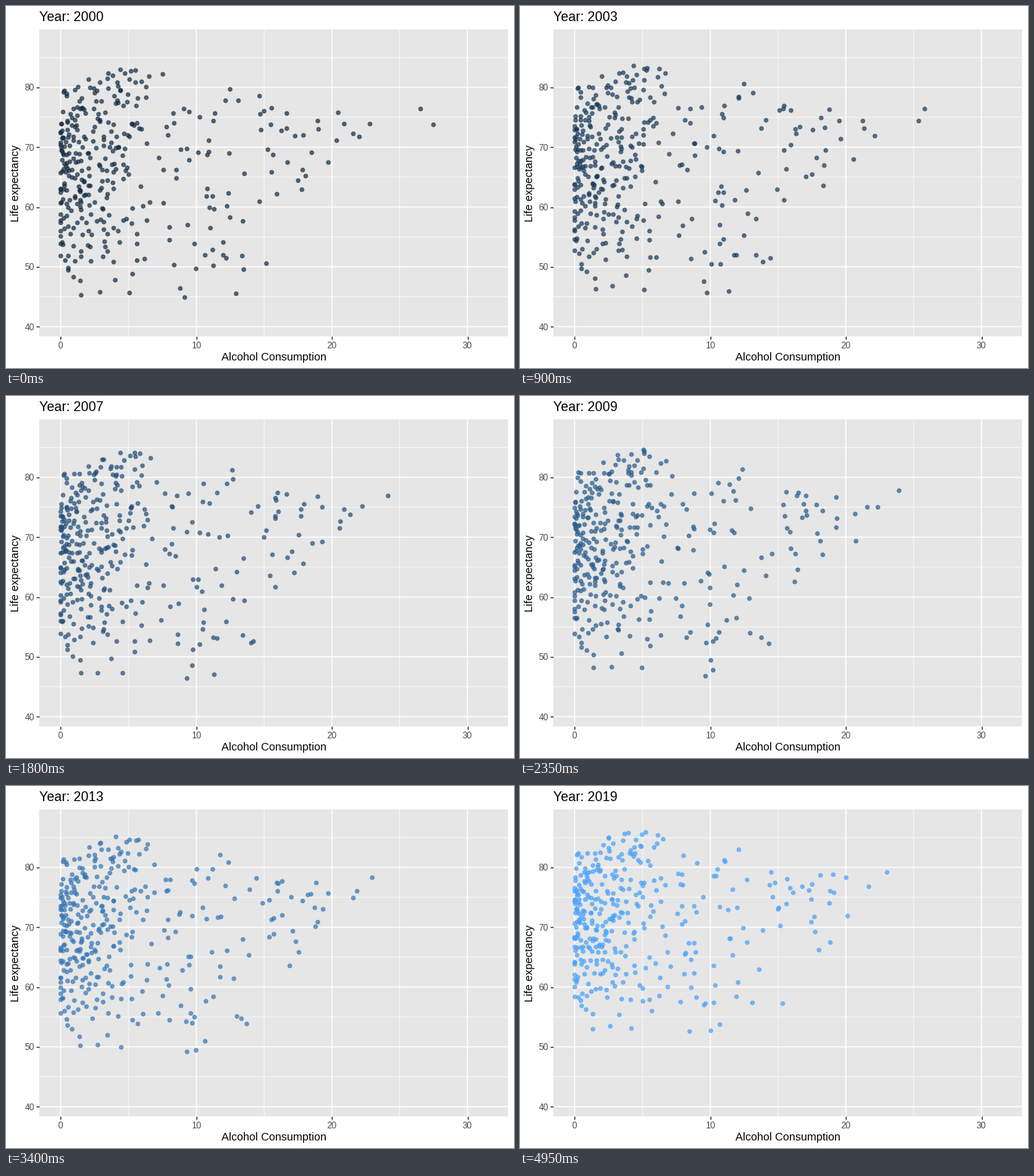
A matplotlib script for the animation above (5 s loop, 672 by 480 pixels).

```python
import numpy as np
import matplotlib.pyplot as plt
from matplotlib.animation import FuncAnimation

W, H, DPI = 672, 480, 96
FRAMES, INTERVAL = 100, 50
FIRST_YEAR, SPAN = 2000, 19
LEFT, RIGHT, TOP, BOTTOM = 44.2, 664.5, 30.6, 438.3
DARK, LIGHT = np.array([19, 43, 67]), np.array([74, 162, 248])
ALPHA = 0.7
COUNTRIES = 183

plt.rcParams["font.family"] = "Liberation Sans"
rng = np.random.default_rng(7)
years = np.arange(SPAN + 1)
key_frames = np.round(years * (FRAMES - 1) / SPAN)


def column(low, high):
    return rng.uniform(low, high, (COUNTRIES, 1))


def spread():
    """Evenly spaced values in (0, 1), in random order."""
    return rng.permutation((np.arange(COUNTRIES) + 0.5) / COUNTRIES)[:, None]


def make_data():
    """Yearly drinking and life expectancy, women first, then men."""
    t = years / SPAN
    wealth, habit = spread(), spread()
    health = wealth ** 0.6

    women_x = np.maximum(7.4 * habit ** 1.5 * (0.5 + 0.5 * wealth) - 0.04, 0)
    men_x = women_x * column(2.9, 4.2)
    # The heaviest drinkers cut back most
    trend = rng.normal(0, 0.15, (COUNTRIES, 1)) - 0.25 * (men_x / 30) ** 3
    change = 1 + trend * t

    best = 31 + 6 * np.sqrt(women_x / 7.4)
    # The shortest lives gain most, and late
    gain = 8 * (1 - health) * t ** 1.4 + 2.8 * health * t
    women_y = 47.5 + best * health + gain
    gap = column(1.5, 4.5) + men_x * column(0.1, 0.4) * (1 - 0.5 * wealth)

    x = np.vstack([women_x * change, men_x * change])
    y = np.vstack([women_y, women_y - gap])
    x *= 1 + rng.normal(0, 0.035, x.shape)
    y += rng.normal(0, 0.25, y.shape)
    order = rng.permutation(len(x))
    return x[order], y[order]


def lerp(a, b, t):
    return a + (b - a) * t


def at_frame(values, i):
    """Straight-line motion between yearly values."""
    k = min(np.searchsorted(key_frames, i, side="right") - 1, SPAN - 1)
    t = (i - key_frames[k]) / (key_frames[k + 1] - key_frames[k])
    return lerp(values[:, k], values[:, k + 1], t)


def px(n):
    return n * 72 / DPI


xs, ys = make_data()

fig = plt.figure(figsize=(W / DPI, H / DPI), dpi=DPI, facecolor="white")
ax = fig.add_axes([LEFT / W, 1 - BOTTOM / H,
                   (RIGHT - LEFT) / W, (BOTTOM - TOP) / H])
ax.set_facecolor("#E6E6E6")
ax.set_xlim(-1.566, 33.01)
ax.set_ylim(38.34, 89.75)
ax.set_xticks(range(0, 31, 10))
ax.set_yticks(range(40, 81, 10))
for spine in ax.spines.values():
    spine.set_visible(False)
ax.tick_params(length=2.75, width=px(1.42), pad=2.2, color="#333333",
               labelcolor="#4D4D4D", labelsize=8.8)


def grid(draw_line, values, width):
    for v in values:
        draw_line(v, color="white", lw=px(width), snap=False, zorder=0.5)


grid(ax.axvline, range(5, 30, 10), 0.71)
grid(ax.axhline, range(45, 90, 10), 0.71)
grid(ax.axvline, range(0, 31, 10), 1.42)
grid(ax.axhline, range(40, 81, 10), 1.42)


def label(x, y, text, size, va="baseline", **kw):
    return fig.text(x / W, 1 - y / H, text, size=size, color="black",
                    va=va, **kw)


title = label(LEFT, 20, "", 13.2)
label((LEFT + RIGHT) / 2, 469.6, "Alcohol Consumption", 11, ha="center")
label(12.8, (TOP + BOTTOM) / 2, "Life expectancy", 11, va="center",
      ha="center", rotation=90)

dots = ax.scatter(xs[:, 0], ys[:, 0], s=px(5.2) ** 2,
                  linewidths=px(0.945), zorder=3)


def draw(i):
    t = i / (FRAMES - 1)
    dots.set_offsets(np.column_stack([at_frame(xs, i), at_frame(ys, i)]))
    color = (*lerp(DARK, LIGHT, t ** 1.2) / 255, ALPHA)
    dots.set_facecolor(color)
    dots.set_edgecolor(color)
    title.set_text(f"Year: {FIRST_YEAR + round(t * SPAN)}")
    return dots, title


anim = FuncAnimation(fig, draw, frames=FRAMES, interval=INTERVAL,
                     repeat=True, repeat_delay=0)
plt.show()
```
